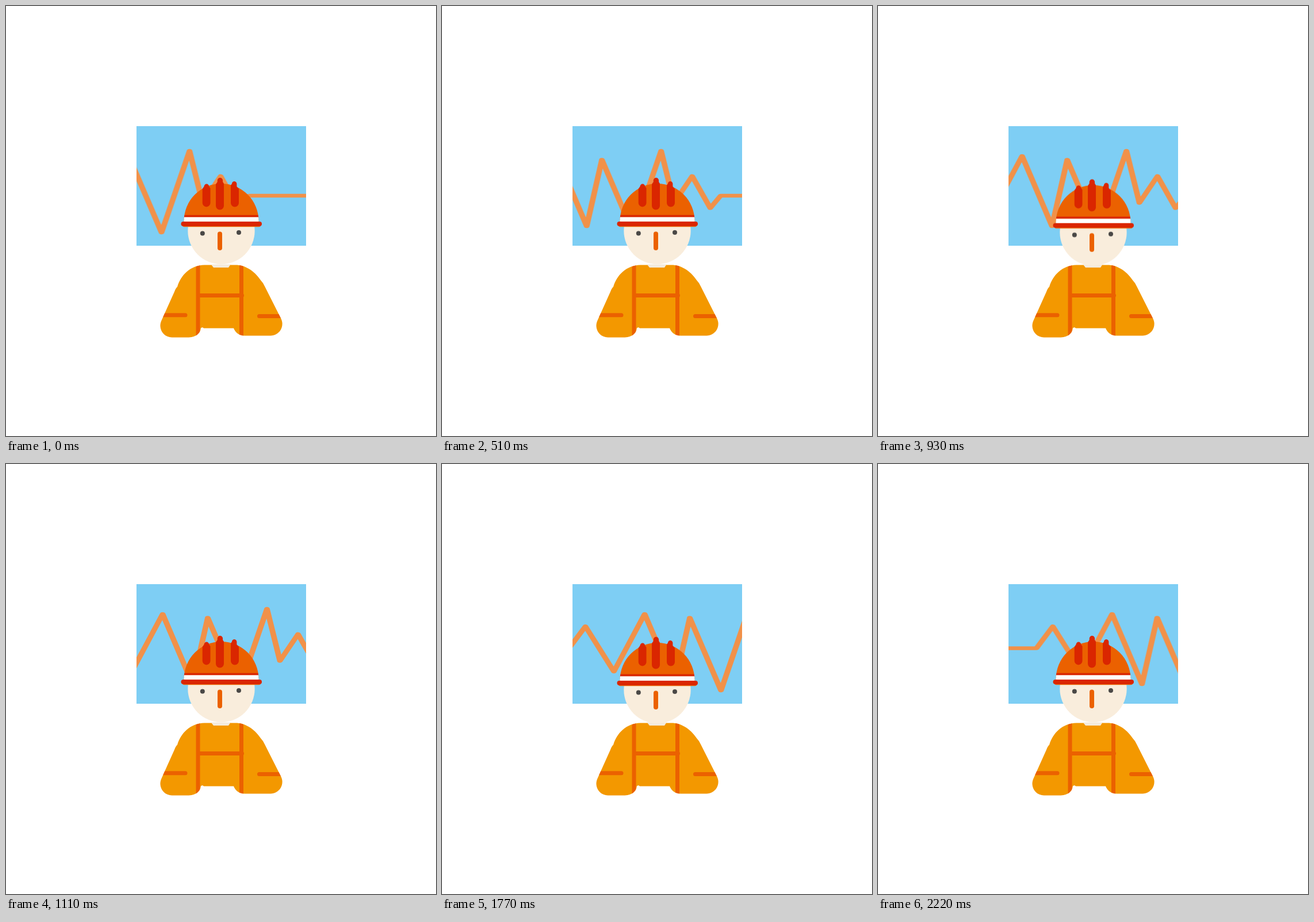
Recreate the animation shown at these times as an HTML page without scripts. Size 748x748 px, loop 2250 ms.

```html
<!DOCTYPE html>
<html lang="en">
<head>
<meta charset="utf-8">
<title>Worker with pulse chart</title>
<style>
  html, body { margin: 0; width: 100%; height: 100%; overflow: hidden; background: #fff; }
  svg { display: block; width: 100%; height: 100%; }

  .sky { fill: #7ecef4; }
  .suit { fill: #f39800; }
  .trim { fill: #eb6100; }
  .red { fill: #da2600; }
  .skin { fill: #f9eddc; }
  .neck { fill: #f3eadc; }
  .eye { fill: #4a4846; }
  .white { fill: #fff; }
  .pulse { fill: none; stroke: #f19149; stroke-width: 6.5; stroke-linejoin: round; }

  .scroll { animation: scroll 2250ms steps(75) -1ms infinite; }
  .head { animation: nod 2250ms -1ms infinite; }

  @keyframes scroll {
    to { transform: translateX(273px); }
  }

  /* two nods of quarter sine waves, the second one smaller */
  @keyframes nod {
    0%, 24.67%, 49.33%, 74% {
      transform: translateY(0);
      animation-timing-function: cubic-bezier(.39, .575, .565, 1);
    }
    12.33%, 37%, 61.67%, 86.33% {
      animation-timing-function: cubic-bezier(.47, 0, .745, .715);
    }
    12.33% { transform: translateY(-4.7px); }
    37% { transform: translateY(7px); }
    61.67% { transform: translateY(-2.8px); }
    86.33% { transform: translateY(3.3px); }
    98.67%, 100% { transform: translateY(0); }
  }
</style>
</head>
<body>
<svg viewBox="0 0 748 748">
  <defs>
    <clipPath id="screen"><rect x="227" y="209" width="295" height="208"/></clipPath>
    <path id="body" d="M345 450.5H357.5L361 455H387L390 450.5H402C421 452 435 465 443 477Q447 481 450 487.500L478 543A20.500 20.500 0 0 1 460 573.500H415Q401 573 396 560.500H344L342 559L339 560Q337 575 318 576.500H289A20.500 20.500 0 0 1 270.500 547L293 497Q295 491 298 488.500C304 468 321 451 345 450.500Z"/>
    <clipPath id="bodyClip"><use href="#body"/></clipPath>
    <path id="dome" d="M309.500 375.500V374A65 65 0 0 1 439.500 374V375.500Z"/>
    <clipPath id="domeClip"><use href="#dome"/></clipPath>
  </defs>

  <g clip-path="url(#screen)">
    <rect class="sky" x="227" y="209" width="295" height="208"/>
    <g class="scroll">
      <path class="pulse" transform="translate(319.300 0) scale(1.500 1)"
        d="M-600 320.500H-208.700L-189.700 282.500L-156.700 361L-121 261L-86.300 383L-68.700 267.500L-32.500 394L0 252L15 342.500L36 296L57 351.500L69 330H300"/>
    </g>
  </g>

  <path class="neck" d="M357 449.500H391L387 455.500H361Z"/>
  <use class="suit" href="#body"/>
  <g class="trim" clip-path="url(#bodyClip)">
    <rect x="330.500" y="440" width="7" height="140"/>
    <rect x="406" y="440" width="7" height="140"/>
    <rect x="333" y="500" width="81" height="7" rx="3.500"/>
    <rect x="260" y="534.300" width="55.500" height="7" rx="3.500"/>
    <rect x="437" y="536" width="55" height="7" rx="3.500"/>
  </g>

  <g class="head">
    <circle class="skin" cx="374.500" cy="391" r="58.200"/>
    <circle class="eye" cx="341.800" cy="395.500" r="4"/>
    <circle class="eye" cx="405" cy="394" r="4"/>
    <rect class="trim" x="368" y="392.500" width="8" height="32.500" rx="4"/>

    <use class="trim" href="#dome"/>
    <g clip-path="url(#domeClip)">
      <rect class="red" x="300" y="363.700" width="150" height="4"/>
      <rect class="white" x="300" y="367.300" width="150" height="9"/>
    </g>
    <rect class="trim" x="307" y="376" width="136" height="8.300" rx="3"/>
    <rect class="red" x="304.500" y="375" width="140.500" height="8" rx="4"/>

    <g class="red">
      <path d="M341.700 318L344.500 314A4.400 4.400 0 0 1 353.300 314L355.500 317V342.500A6.900 6.900 0 0 1 341.700 342.500Z"/>
      <path d="M365 310L367.700 306V303.500A4.700 4.700 0 0 1 377.100 303.500V306L379 309V347.500A7 7 0 0 1 365 347.500Z"/>
      <path d="M391 312L393 309A4.200 4.200 0 0 1 401.400 309.500V314L405 318V342.500A7 7 0 0 1 391 342.500Z"/>
    </g>
  </g>
</svg>
</body>
</html>
```
